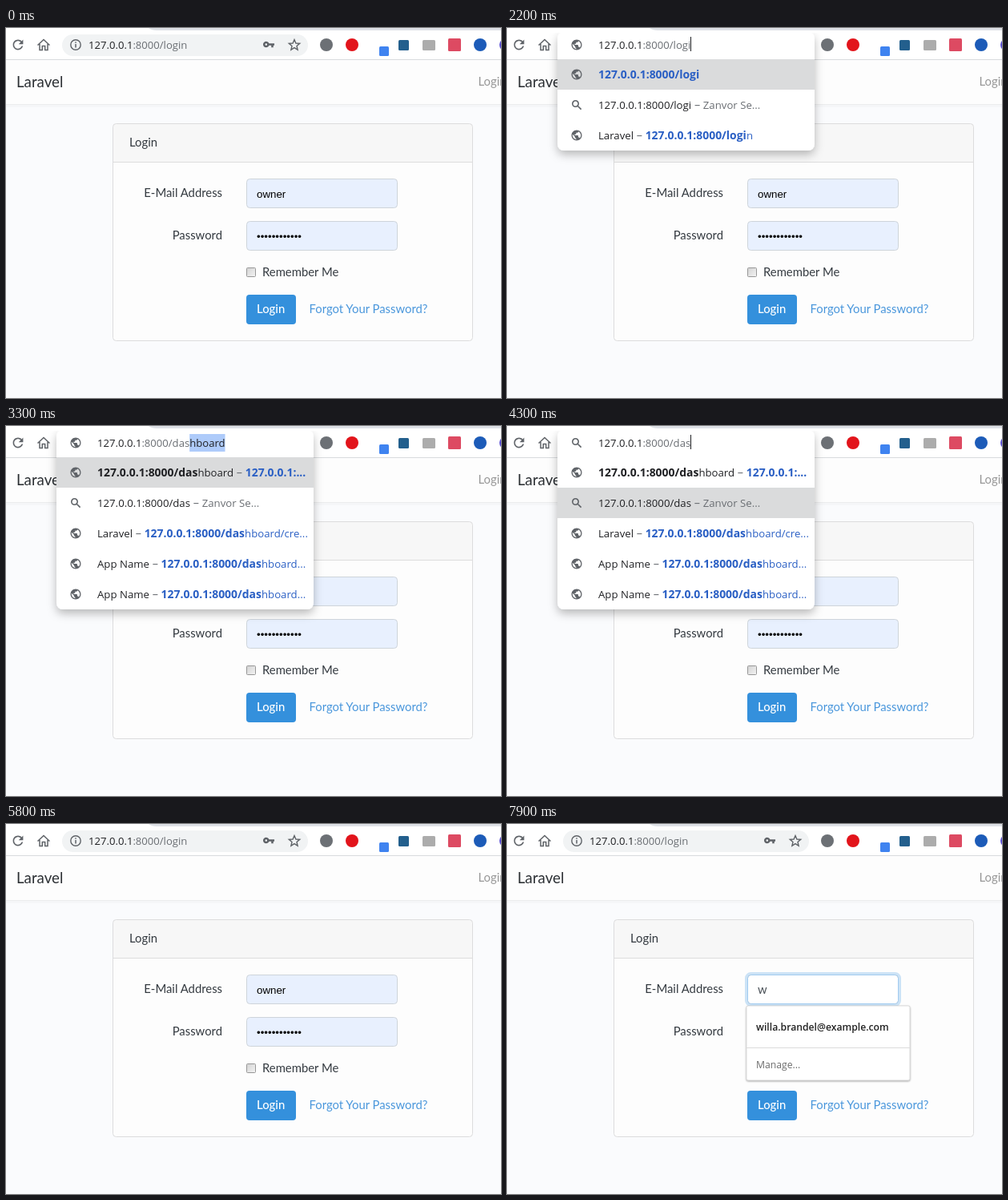
Recreate the animation shown at these times as an HTML page. Size 618 by 462 pixels, loop 8000 ms.

```html
<!DOCTYPE html>
<html lang="en">
<head>
<meta charset="utf-8">
<title>Login page</title>
<style>
  html, body { margin: 0; width: 100%; height: 100%; overflow: hidden; background: #fafbfd; }
  svg { display: block; width: 618px; height: 462px; }
  text { white-space: pre; }
  .page text { font: 14.85px Lato, sans-serif; fill: #343a40; }
  .bar text { font: 13.2px "Open Sans", sans-serif; fill: #202124; }
  .bar #url { font-size: 13.1px; }
  .page .brand { font-size: 18.7px; fill: #2b2f33; }
  .page .field { font: 13.33px "Liberation Sans", Arial, sans-serif; fill: #000; }
  .page .menu { font: 12.2px "Open Sans", sans-serif; fill: #6b6b6b; }
  .page .strong { font-weight: 600; fill: #222; }
  .end { text-anchor: end; }
  .dim { fill: #6a6e73; }
  .dash { fill: #6a6e73; font-size: 14.4px; }
  .blue { fill: #2a5fc4; }
  .bold { font-weight: 700; font-size: 13.95px; }
</style>
</head>
<body>
<svg viewBox="0 0 618 462" xmlns="http://www.w3.org/2000/svg">
  <defs>
    <filter id="drop" x="-20%" y="-20%" width="140%" height="150%">
      <feDropShadow dx="0" dy="5" stdDeviation="6" flood-color="#000" flood-opacity=".27"/>
    </filter>
    <filter id="soft" x="-10%" y="-10%" width="120%" height="130%">
      <feDropShadow dx="0" dy="1" stdDeviation="1" flood-color="#000" flood-opacity=".4"/>
    </filter>
    <clipPath id="below"><rect y="6" width="618" height="456"/></clipPath>
    <linearGradient id="check" x2="1" y2="1">
      <stop stop-color="#d2d2d2"/><stop offset="1" stop-color="#f4f4f4"/>
    </linearGradient>
    <path id="globe" transform="scale(.65) translate(-12 -12)" fill="#5f6368" d="M12 2C6.48 2 2 6.48 2 12s4.48 10 10 10 10-4.48 10-10S17.52 2 12 2zm-1 17.93c-3.95-.49-7-3.85-7-7.93 0-.62.08-1.21.21-1.79L9 15v1c0 1.1.9 2 2 2v1.93zm6.9-2.54c-.26-.81-1-1.39-1.9-1.39h-1v-3c0-.55-.45-1-1-1H8v-2h2c.55 0 1-.45 1-1V7h2c1.1 0 2-.9 2-2v-.41c2.93 1.19 5 4.06 5 7.41 0 2.08-.8 3.97-2.1 5.39z"/>
    <path id="lens" fill="none" stroke="#5f6368" stroke-width="1.6" d="M2.2-1.5a3.7 3.7 0 1 0-7.4 0a3.7 3.7 0 1 0 7.4 0M1.2 1.2L5.6 5.6"/>
  </defs>

  <g class="page">
    <rect width="618" height="462" fill="#fafbfd"/>
    <rect y="96" width="618" height="3" fill="#000" opacity=".02"/>
    <rect y="40" width="618" height="56" fill="#fdfdfd"/>
    <path d="M0 95.5H618" stroke="#ececed"/>
    <text class="brand" x="13" y="74">Laravel</text>
    <text x="589.5" y="72" style="fill:#979797">Login</text>

    <rect x="133.5" y="119.5" width="449" height="271" rx="4" fill="#fdfdfd"/>
    <path d="M133.5 167.5V123.5a4 4 0 0 1 4-4H578.5a4 4 0 0 1 4 4V167.5Z" fill="#f7f7f7"/>
    <path d="M134 167.5H582" stroke="#dcdcdd"/>
    <rect x="133.5" y="119.5" width="449" height="271" rx="4" fill="none" stroke="#dcdcdd"/>
    <text x="154" y="148">Login</text>
    <text class="end" x="270" y="211">E-Mail Address</text>
    <text class="end" x="270" y="264">Password</text>
    <rect x="300.5" y="299.5" width="11" height="11" rx="1" fill="url(#check)" stroke="#979797"/>
    <text x="320" y="310">Remember Me</text>
    <rect x="300" y="333" width="62" height="37" rx="4" fill="#3490dc"/>
    <text x="313" y="356" style="fill:#fff;font-weight:500">Login</text>
    <text x="378.5" y="356" style="fill:#4a97dc">Forgot Your Password?</text>
    <g id="form"></g>
  </g>

  <g class="bar">
    <rect width="618" height="40" fill="#fff"/>
    <path d="M178 0Q182 3 188 3H618V0Z" fill="#dee1e6"/>
    <path d="M0 39.5H618" stroke="#d9dbde"/>
    <g id="load"></g>
    <path d="M39.5 21.5L47 14.5L54.5 21.5M42 20V27.5H45.3V22.5H48.7V27.5H52V20" fill="none" stroke="#5f6368" stroke-width="1.5"/>
    <g id="marks"></g>
    <g id="pill"></g>
    <g id="list" clip-path="url(#below)"></g>
    <g id="hint"></g>
    <rect id="pick" y="10" height="22" fill="#aecbfa"/>
    <text id="url" y="26"></text>
    <rect id="caret" y="11" width="1" height="18" fill="#202124"/>
  </g>
</svg>

<script>
const LOOP = 8000, STEP = 100;
const BASE = '127.0.0.1:8000/';
const USER = 'owner', MAIL = 'willa.brandel@example.com';
const $ = id => document.getElementById(id);
const span = (text, cls = '') => `<tspan class="${cls}">${text}</tspan>`;
const use = (id, x, y) => `<use href="#${id}" x="${x}" y="${y}"/>`;
const within = (t, a, b) => t >= a && t < b;

// [start, typed path]
const TYPED = [[2200, 'logi'], [2300, 'log'], [2500, 'lo'], [2700, ''],
  [2900, 'd'], [3200, 'da'], [3300, 'das']];

const reload = '<path transform="translate(15 21) scale(.8) translate(-12 -12)" fill="#5f6368" d="M17.65 6.35C16.2 4.9 14.21 4 12 4c-4.42 0-7.99 3.58-7.99 8s3.57 8 7.99 8c3.73 0 6.84-2.55 7.73-6h-2.08c-.82 2.33-3.04 4-5.65 4-3.31 0-6-2.69-6-6s2.69-6 6-6c1.66 0 3.14.69 4.22 1.78L13 11h7V4l-2.35 2.35z"/>';
const stop = '<path d="M10 16L20 26M20 16L10 26" stroke="#5f6368" stroke-width="1.8"/>';
const info = '<circle cx="87" cy="21" r="6.2" fill="none" stroke="#5f6368" stroke-width="1.4"/><path d="M87 20V24.5M87 17.3V18.8" stroke="#5f6368" stroke-width="1.5"/>';
const key = '<path transform="translate(328 20.5) scale(.64) translate(-12 -12)" fill="#5f6368" d="M12.65 10C11.83 7.67 9.61 6 7 6c-3.31 0-6 2.69-6 6s2.69 6 6 6c2.61 0 4.83-1.67 5.65-4H17v4h4v-4h2v-4H12.65zM7 14c-1.1 0-2-.9-2-2s.9-2 2-2 2 .9 2 2-.9 2-2 2z"/>';

function starPoints(cx, cy, r) {
  return Array.from({ length: 10 }, (_, i) => {
    const a = Math.PI * (i / 5 - .5), d = i % 2 ? r * .45 : r;
    return (cx + d * Math.cos(a)).toFixed(1) + ',' + (cy + d * Math.sin(a)).toFixed(1);
  }).join(' ');
}
const star = `<polygon points="${starPoints(360, 21.5, 7)}" fill="none" stroke="#5f6368" stroke-width="1.4"/>`;

const dot = (x, fill) => `<circle cx="${x}" cy="21" r="8" fill="${fill}"/>`;
const box = (x, y, w, h, fill) => `<rect x="${x}" y="${y}" width="${w}" height="${h}" rx="1.5" fill="${fill}"/>`;
$('marks').innerHTML = dot(400, '#6c7075') + dot(432, '#e2141b') + box(466, 23, 12, 12, '#3f83f0')
  + box(490, 15, 13, 13, '#235f8d') + box(520, 15, 16, 13, '#acacac')
  + box(552, 13, 16, 16, '#dd4a62') + dot(592, '#1c5bb8') + dot(624, '#5b50d6');

function pill(focus, hasKey) {
  return `<rect x="70" y="8" width="307" height="27" rx="13.5" fill="#f1f3f4"/>
    <rect x="69.5" y="7.5" width="308" height="28" rx="14" fill="#fff" stroke="#a3c4f5" stroke-width="2" opacity="${focus}"/>`
    + info + (hasKey ? key : '') + star;
}

function rows(path) {
  const typed = BASE + path;
  const dash = span(' – ', 'dash');
  const hit = rest => span(typed, 'blue bold') + span(rest, 'blue');
  const search = span(typed) + dash + span('Zanvor Se...', 'dim');
  const cut = s => s.slice(path.length);
  if (path[0] === 'd') {
    const app = 'App Name' + dash + hit(cut('dashboard') + '...');
    return [span(typed, 'bold') + cut('dashboard') + dash + span('127.0.0.1:...', 'blue bold'),
      search, 'Laravel' + dash + hit(cut('dashboard/cre') + '...'), app, app];
  }
  const list = [hit(''), search, 'Laravel' + dash + hit(cut('login'))];
  if (path.length < 4) list.push('Laravel' + dash + hit(cut('logout')));
  return list;
}

function dropdown(path, active, alpha) {
  const list = rows(path);
  const lines = list.map((row, i) => {
    const y = 58 + 38 * i;
    return (i === active ? `<rect x="63" y="${y - 19}" width="321" height="38" fill="#dadbdc"/>` : '')
      + use(i === 1 ? 'lens' : 'globe', 87, y) + `<text x="114" y="${y + 5}">${row}</text>`;
  }).join('');
  return `<g opacity="${alpha}"><rect x="63" y="5" width="321" height="${34 + 38 * list.length}" rx="8" fill="#fff" filter="url(#drop)"/>${lines}</g>`;
}

function menu(w, h, split, items) {
  return `<rect x="299" y="227" width="${w}" height="${h}" rx="2" fill="#fff" stroke="#c4c4c4" stroke-width=".6" filter="url(#soft)"/>
    <path d="M299 ${split}.5H${299 + w}" stroke="#dcdcdc"/>` + items;
}
const item = (y, s, cls = '') => `<text class="menu ${cls}" x="311" y="${y}">${s}</text>`;

function form(t) {
  const empty = within(t, 5500, 5700), edit = t >= 7400;
  const ring = t < 6900 ? 0 : Math.min(1, (t - 6800) / 300);
  const input = (y, plain) => `<rect x="300.5" y="${y}.5" width="188" height="36" rx="4" fill="${plain ? '#fff' : '#e8f0fe'}" stroke="#ced4da"/>`;
  let out = `<rect x="298.5" y="186.5" width="192" height="40" rx="6" fill="none" stroke="#cce3f6" stroke-width="3" opacity="${ring}"/>`
    + input(188, empty || edit) + input(241, empty)
    + `<rect x="300.5" y="188.5" width="188" height="36" rx="4" fill="none" stroke="#a1cbef" opacity="${ring}"/>`;
  if (!empty) {
    out += edit ? '<text x="313" y="212" style="fill:#495057">w</text>'
      : `<text class="field" x="313" y="212">${USER}</text>`;
    out += `<text class="field" x="313" y="265">${'•'.repeat(12)}</text>`;
  }
  if (within(t, 7400, 7900)) out += '<rect x="325" y="197" width="1" height="20" fill="#495057"/>';
  if (within(t, 7000, 7400))
    out += menu(190, 113, 299, item(255, USER, 'strong') + item(277, '•'.repeat(12)) + item(325, 'Manage passwords...'));
  if (t >= 7500)
    out += menu(204, 93, 279, item(258, MAIL, 'strong') + item(305, 'Manage...'));
  return out;
}

function render(t) {
  const open = within(t, 2200, 4800);
  const path = TYPED.reduce((last, [at, s]) => t >= at ? s : last, '');
  const active = t >= 4500 ? 2 : t >= 4300 ? 1 : 0;
  const focus = within(t, 700, 4800) ? Math.min(1, (t - 600) / 200) : 0;
  const complete = open && !active && path[0] === 'd';

  let address = 'login';
  if (within(t, 4500, 5400)) address = 'dashboard/create';
  else if (open) address = complete ? 'dashboard' : path;

  $('load').innerHTML = within(t, 4800, 5700) ? stop : reload;
  $('pill').innerHTML = pill(focus, !within(t, 4800, 5700));
  $('list').innerHTML = open ? dropdown(path, active, 1)
    : within(t, 4800, 5000) ? dropdown(path, -1, t < 4900 ? .12 : .03) : '';
  $('hint').innerHTML = open ? use(active === 1 ? 'lens' : 'globe', 87, 21) : '';
  $('form').innerHTML = form(t);

  const url = $('url'), x = open ? 114 : 103;
  url.setAttribute('x', x);
  url.innerHTML = '127.0.0.1' + span(':8000/' + address, 'dim');
  const end = x + url.getComputedTextLength();

  const all = within(t, 900, 1300);
  let from = end;
  if (all) from = x;
  if (complete) {
    from = x + url.getSubStringLength(0, BASE.length + path.length);
    url.innerHTML = '127.0.0.1' + span(':8000/' + path, 'dim') + address.slice(path.length);
  }
  $('pick').setAttribute('x', from);
  $('pick').setAttribute('width', Math.max(0, end - from));

  const blink = within(t, 1300, 1800) || within(t, 2200, 2900) || within(t, 4300, 4800);
  $('caret').setAttribute('x', Math.round(end));
  $('caret').setAttribute('opacity', blink ? 1 : 0);
}

let start = null, shown = -1;
function tick(now) {
  if (start === null) start = now;
  const t = Math.floor(((now - start) % LOOP) / STEP) * STEP;
  if (t !== shown) render(shown = t);
  requestAnimationFrame(tick);
}
render(0);
requestAnimationFrame(tick);
</script>
</body>
</html>
```
